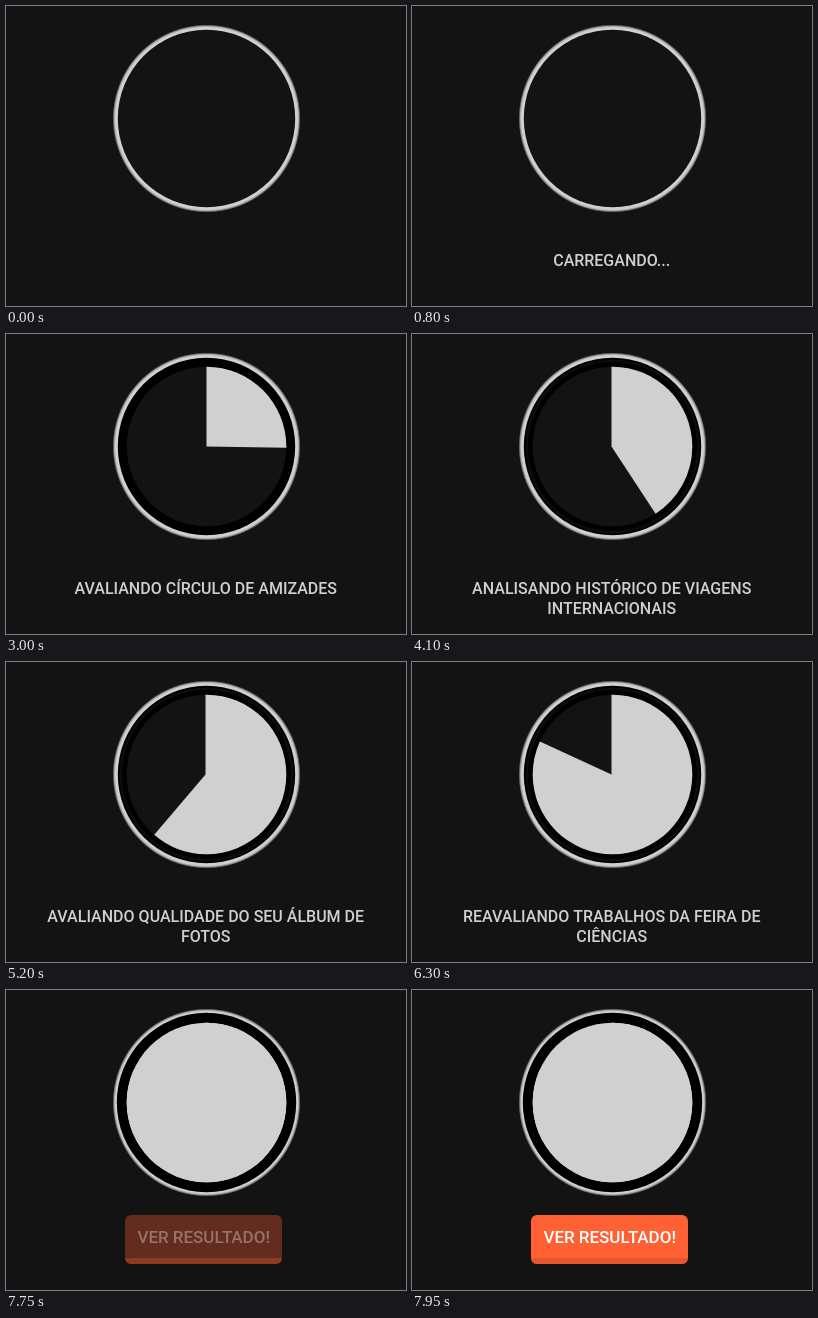
Write an HTML page with a canvas that moves like this. It is 400x300 px and loops after 8.05 s.

```html
<!DOCTYPE html>
<html lang="pt-BR">
<head>
<meta charset="utf-8">
<style>
html, body { margin: 0; width: 100%; height: 100%; overflow: hidden; background: #131313; }
canvas { display: block; }
</style>
</head>
<body>
<canvas id="stage" width="400" height="300"></canvas>
<script>
const ctx = document.getElementById('stage').getContext('2d');
const LOOP = 8050, CX = 200.5, CY = 112.5, PIE_R = 79.8;
const BACK = '#131313', LIGHT = '#d0d0d0';

// One message every STEP ms, beginning at FIRST
const FIRST = 1350, STEP = 550;
const messages = [
  ['ANALISANDO INFORMAÇÕES DO SEU PERFIL', 'PESSOAL'],
  ['ANALISANDO FILMES E LIVROS PREFERIDOS'],
  ['VERIFICANDO GRUPOS E PÁGINAS CURTIDAS'],
  ['AVALIANDO CÍRCULO DE AMIZADES'],
  ['ANALISANDO MÚSICAS E BANDAS FAVORITAS'],
  ['ANALISANDO HISTÓRICO DE VIAGENS', 'INTERNACIONAIS'],
  ['CALCULANDO POPULARIDADE ENTRE SEUS', 'AMIGOS'],
  ['AVALIANDO QUALIDADE DO SEU ÁLBUM DE', 'FOTOS'],
  ['VERIFICANDO HISTÓRICO DE MENSAGENS', 'PRIVADAS'],
  ['REAVALIANDO TRABALHOS DA FEIRA DE', 'CIÊNCIAS']
];
const LAST = messages.length - 1;

const clamp = v => Math.max(0, Math.min(1, v));

// Opacity rising in equal steps of 100 ms
const fade = (t, start, steps) => clamp((Math.floor((t - start) / 100) + 1) / steps);

function disc(radius, color) {
  ctx.fillStyle = color;
  ctx.beginPath();
  ctx.arc(CX, CY, radius, 0, Math.PI * 2);
  ctx.fill();
}

function label(text, x, y, size, color) {
  ctx.font = `500 ${size}px Roboto, sans-serif`;
  ctx.textAlign = 'center';
  ctx.fillStyle = color;
  ctx.fillText(text, x, y);
}

function drawRing() {
  const glow = ctx.createRadialGradient(CX, CY, 88, CX, CY, 94);
  glow.addColorStop(0, LIGHT);
  glow.addColorStop(0.5, LIGHT);
  glow.addColorStop(0.72, '#a0a0a0');
  glow.addColorStop(1, BACK);
  disc(94, glow);
}

function drawTrack(t) {
  if (t < FIRST) return disc(88.7, BACK);
  disc(t < 7750 ? 88.7 : 89.7, '#000');
  if (t >= 4100 && t < 7750) {
    disc(87, '#0c0c0c');
    disc(84.5, '#000');
  }
  disc(PIE_R, BACK);
}

function drawWedge(degrees, apexX) {
  const top = -Math.PI / 2;
  ctx.fillStyle = LIGHT;
  ctx.beginPath();
  ctx.moveTo(apexX, CY);
  ctx.lineTo(apexX, CY - PIE_R);
  ctx.arc(CX, CY, PIE_R, top, top + degrees * Math.PI / 180);
  ctx.fill();
}

function wedgeAngle(index) {
  return index <= 5 ? 34.5 + (index - 1) * 28.2 : 147.3 + (index - 5) * 36.8;
}

function drawMessage(lines) {
  lines.forEach((line, i) => label(line, 199.7, 260.3 + i * 19.8, 16, LIGHT));
}

function drawButton() {
  ctx.save();
  ctx.beginPath();
  ctx.roundRect(119, 225, 157, 49, 6);
  ctx.clip();
  ctx.fillStyle = '#ff6134';
  ctx.fillRect(119, 225, 157, 49);
  ctx.fillStyle = '#e6562f';
  ctx.fillRect(119, 268, 157, 6);
  ctx.restore();
  label('VER RESULTADO!', 197.7, 253, 17, '#fff');
}

function withAlpha(alpha, draw) {
  ctx.globalAlpha = alpha;
  draw();
  ctx.globalAlpha = 1;
}

function render(t) {
  ctx.fillStyle = BACK;
  ctx.fillRect(0, 0, 400, 300);
  drawRing();
  drawTrack(t);

  if (t < FIRST) {
    withAlpha(fade(t, 500, 4), () => drawMessage(['CARREGANDO...']));
  } else {
    const index = Math.min(LAST, Math.floor((t - FIRST) / STEP));
    const finish = fade(t, 6850, 9);
    if (index > 0) drawWedge(wedgeAngle(index), index < 4 ? CX : 199.5);
    withAlpha(finish, () => disc(PIE_R, LIGHT));
    withAlpha(1 - finish, () => drawMessage(messages[index]));
    withAlpha(fade(t, 7750, 3), drawButton);
  }
}

function tick() {
  render(performance.now() % LOOP);
  requestAnimationFrame(tick);
}
tick();
</script>
</body>
</html>
```
